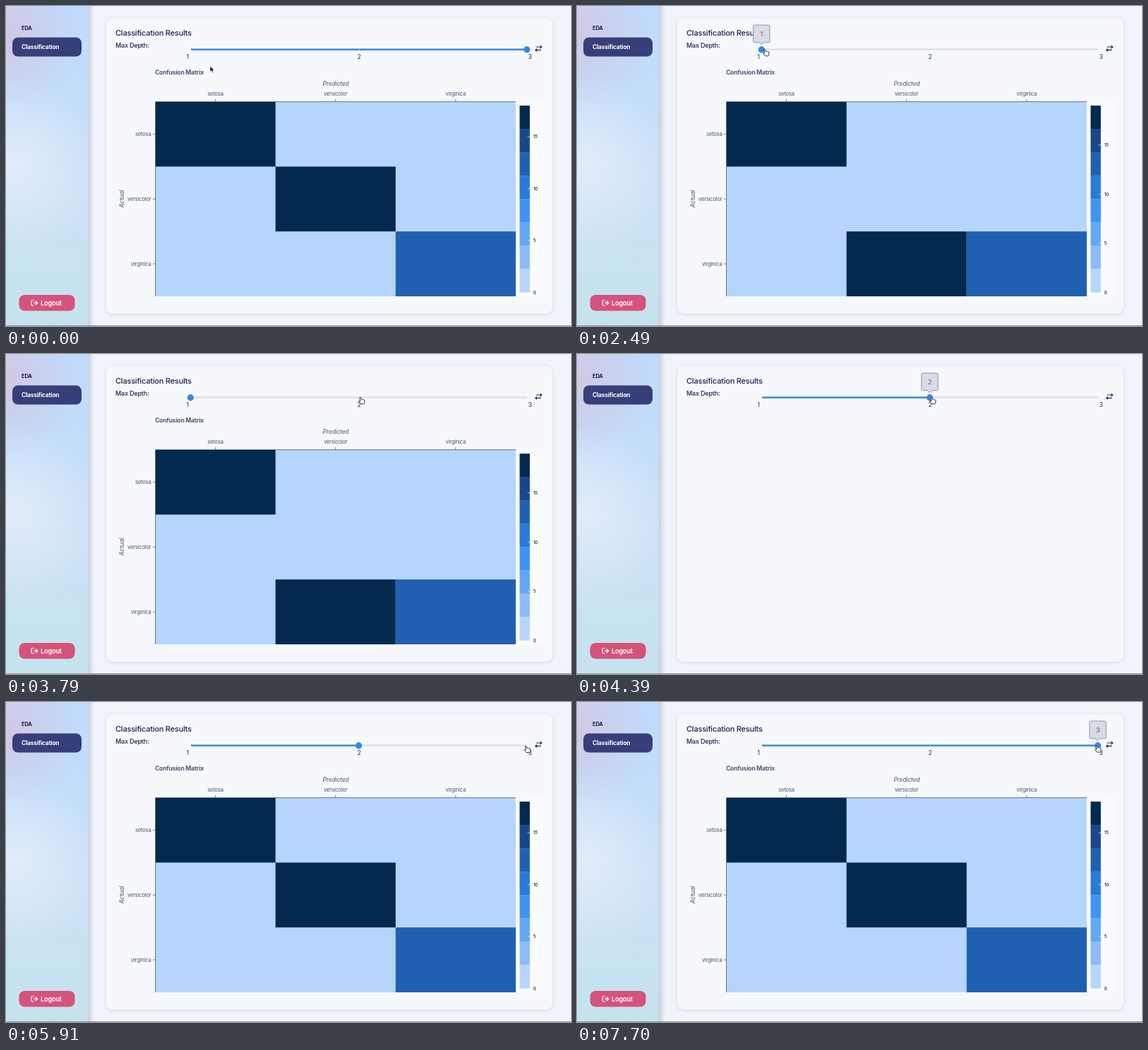
An HTML page that plays this animation: 800x453 px, repeating every 7730 ms.

```html
<!DOCTYPE html>
<html lang="en">
<head>
<meta charset="utf-8">
<title>Classification Results</title>
<style>
  html, body { margin: 0; width: 100%; height: 100%; overflow: hidden; }
  body { background: #f2f4fb; }
  svg { position: absolute; left: 0; top: 0; }
  text { font-family: Inter, "Open Sans", sans-serif; letter-spacing: -.02em; fill: #1a2350; }
  .mid { text-anchor: middle; }
  .end { text-anchor: end; }
  .bold { font-weight: 700; }
  .axis text { font-size: 7.5px; fill: #4d5470; }
  .axis .title { font-size: 8.5px; font-style: italic; }
  .scale text { font-size: 6.3px; font-weight: 500; fill: #242a3c; }
  .marks text { font-size: 8.3px; }
  .icon { fill: none; stroke-linecap: round; stroke-linejoin: round; }
</style>
</head>
<body>
<svg width="800" height="453" viewBox="0 0 800 453">
  <defs>
    <linearGradient id="side" x1="0" y1="0" x2="0" y2="1">
      <stop offset="0" stop-color="#bfdbff"/>
      <stop offset=".3" stop-color="#c2def9"/>
      <stop offset=".6" stop-color="#cbe2f5"/>
      <stop offset="1" stop-color="#c5e3ee"/>
    </linearGradient>
    <radialGradient id="pink" gradientUnits="userSpaceOnUse" cx="0" cy="40" r="110">
      <stop offset="0" stop-color="#d2c8e2"/>
      <stop offset="1" stop-color="#d2c8e2" stop-opacity="0"/>
    </radialGradient>
    <radialGradient id="pale" gradientUnits="userSpaceOnUse" cx="14" cy="225" r="125">
      <stop offset="0" stop-color="#e2ebfa"/>
      <stop offset="1" stop-color="#e2ebfa" stop-opacity="0"/>
    </radialGradient>
    <linearGradient id="edge">
      <stop offset="0" stop-color="#4b5170" stop-opacity=".24"/>
      <stop offset="1" stop-color="#4b5170" stop-opacity="0"/>
    </linearGradient>
    <filter id="soft" x="-5%" y="-5%" width="110%" height="110%">
      <feDropShadow dx="0" dy="1" stdDeviation="2" flood-color="#40486e" flood-opacity=".2"/>
    </filter>
  </defs>

  <rect x="116" width="9" height="453" fill="url(#edge)"/>
  <rect width="116" height="453" fill="url(#side)"/>
  <rect width="116" height="453" fill="url(#pink)"/>
  <rect width="116" height="453" fill="url(#pale)"/>
  <text class="bold" x="22" y="34" font-size="7.5">EDA</text>
  <rect x="9" y="44.5" width="98" height="27" rx="8" fill="#383e7a"/>
  <text class="bold" x="22" y="61" font-size="8.3" style="fill:#fff">Classification</text>
  <rect x="18.5" y="409" width="79" height="22.5" rx="8" fill="#d5527a"/>
  <path class="icon" stroke="#fff" stroke-width="1.2" d="M39 416.5H37.5Q36 416.5 36 418V422.5Q36 424 37.5 424H39M39.5 420.2H44.5M42 417.6L44.7 420.2L42 422.8"/>
  <text x="49" y="423.6" font-size="9.2" font-weight="600" style="fill:#fff">Logout</text>

  <rect x="142" y="17.5" width="632" height="418" rx="9" fill="#f7f8fb" filter="url(#soft)"/>
  <text x="155" y="41.6" font-size="11" font-weight="500">Classification Results</text>
  <text x="155" y="59.2" font-size="9" font-weight="500">Max Depth:</text>
  <path class="icon" stroke="#1a2350" stroke-width="1.1" d="M751 58H758.5M756.6 56.2L758.5 58L756.6 59.8M757 62.4H749.5M751.4 60.6L749.5 62.4L751.4 64.2"/>

  <g id="chart">
    <text class="bold" x="211" y="97.3" font-size="8.5" style="fill:#4d5470">Confusion Matrix</text>
    <rect x="722" y="135.5" width="38" height="275.5" fill="#fafbfc"/>
    <rect x="211.5" y="135.5" width="510.3" height="275.5" fill="#b6d5fb"/>
    <g id="cells"></g>
    <g class="axis" id="axis">
      <path d="M211.5 411V135.5H721.8" fill="none" stroke="#555d74" stroke-width=".8"/>
      <text class="mid title" x="467" y="112.8">Predicted</text>
      <text class="mid title" transform="translate(167 273) rotate(-90)">Actual</text>
    </g>
    <g class="scale" id="bands"></g>
    <g class="scale" id="ticks"></g>
  </g>

  <rect x="262" y="60.6" width="476" height="2" rx="1" fill="#d9dce8"/>
  <rect id="fill" x="262" y="60.4" height="2.4" fill="#318ae6"/>
  <rect x="499.5" y="60.6" width="1" height="2" fill="#a9cdf4"/>
  <circle id="knob" cy="61.7" r="4.6" fill="#318ae6"/>
  <g class="marks mid">
    <text x="257" y="75">1</text><text x="500" y="75">2</text><text x="742" y="75">3</text>
  </g>
  <g id="tip">
    <path d="M-10 27H10Q11.7 27 11.7 28.7V50Q11.7 51.7 10 51.7H3L0 54.7L-3 51.7H-10Q-11.7 51.7-11.7 50V28.7Q-11.7 27-10 27Z" fill="#d9dbe5" stroke="#858ba6" stroke-width=".9"/>
    <text class="mid" id="tipText" y="42.6" font-size="9.5" style="fill:#596080"></text>
  </g>

  <path id="arrow" d="M0 0V8.3L1.9 6.6L3.2 9.6L4.7 9L3.4 6.1H6Z" fill="#111" stroke="#fff" stroke-width=".7"/>
  <path id="hand" d="M-1.6 .2Q-.8 -.6 0 .2L.8 2.8Q1.8 2.2 2.4 3Q3.4 2.5 4 3.4Q5.2 3 5.4 4.4V6.4Q5.3 7.8 4.5 9.2H-.2L-2.9 5.8Q-3.3 4.8 -2.2 4.7L-.8 5.5Z" fill="#fff" stroke="#222" stroke-width=".9" stroke-linejoin="round"/>
  <rect y="452" width="800" height="1" fill="#92959d"/>
</svg>
<script>
const LOOP = 7730;
const $ = id => document.getElementById(id);
const NAMES = ['setosa', 'versicolor', 'virginica'];
const BANDS = ['#03294f', '#18488a', '#1f61b0', '#287bd8', '#3f94f2', '#62a7f3', '#8dbdf6', '#b8d6fb'];
const [LEFT, TOP, CELL_W, CELL_H] = [211.5, 135.5, 170.1, 91.83];
const KNOB = [0, 261.3, 499.5, 737.5];

// Slider clicks: the chart is blank from `blank` until `ready`.
const CLICKS = [
  { at: 1900, blank: 1950, ready: 2480, tipEnd: 2520, value: 1 },
  { at: 4060, blank: 4110, ready: 4720, tipEnd: 5060, value: 2 },
  { at: 6170, blank: 6220, ready: 6830, tipEnd: LOOP, value: 3 }
];
// Pointer path: time, x, y
const PATH = [
  [0, 289, 85], [900, 289, 85], [1600, 269, 63], [1820, 269, 63], [1900, 266.5, 61.5],
  [3000, 266.5, 61.5], [3800, 502.5, 61.5], [5000, 502.5, 61.5], [5800, 737, 62.5],
  [6000, 737, 62.5], [6170, 737, 61.8], [LOOP, 736.5, 61.8]
];

const cell = (row, col, color) =>
  `<rect x="${LEFT + col * CELL_W}" y="${TOP + row * CELL_H}" width="${CELL_W}" height="${CELL_H}" fill="${color}"/>`;

NAMES.forEach((name, i) => {
  const x = LEFT + (i + .5) * CELL_W, y = TOP + (i + .5) * CELL_H;
  $('axis').innerHTML += `<path d="M${x} 132V135.5M208 ${y}H211.5" stroke="#555d74" stroke-width=".8"/>
    <text class="mid" x="${x}" y="127.4">${name}</text><text class="end" x="205.5" y="${y + 2.6}">${name}</text>`;
});
$('bands').innerHTML = BANDS.map((color, i) =>
  `<rect x="727.3" y="${141 + i * 33.06}" width="14.4" height="33.2" fill="${color}"/>`).join('');

function drawChart(value) {
  const predicted = value === 1 ? [0, 2] : [0, 1];
  const step = value === 1 ? 69.6 : 73.45;
  $('cells').innerHTML = cell(0, 0, BANDS[0]) +
    cell(predicted[1], 1, BANDS[0]) + cell(2, 2, BANDS[2]);
  $('ticks').innerHTML = [0, 1, 2, 3].map(i => {
    const y = 405.5 - i * step;
    return `<path d="M738.5 ${y}H742" stroke="#dce8f8" stroke-width=".8"/><text x="746.5" y="${y + 2.2}">${i * 5}</text>`;
  }).join('');
}

function pointerAt(t) {
  const i = PATH.findIndex(p => p[0] > t);
  const [t0, x0, y0] = PATH[i - 1], [t1, x1, y1] = PATH[i];
  const u = (t - t0) / (t1 - t0), e = u * u * (3 - 2 * u);
  return [x0 + (x1 - x0) * e, y0 + (y1 - y0) * e];
}

const show = (id, on) => $(id).style.display = on ? '' : 'none';
let drawn = 0;

function frame(now) {
  const t = now % LOOP;
  const click = CLICKS.filter(c => t >= c.at).pop();
  const value = click ? click.value : 3;
  if (value !== drawn) drawChart(drawn = value);
  show('chart', !click || t < click.blank || t >= click.ready);

  const x = KNOB[value];
  $('knob').setAttribute('cx', x);
  $('fill').setAttribute('width', Math.max(0, x - 262));
  show('tip', click && t < click.tipEnd);
  $('tip').setAttribute('transform', `translate(${x} 0)`);
  $('tipText').textContent = value;

  const at = `translate(${pointerAt(t)})`;
  $('arrow').setAttribute('transform', at);
  $('hand').setAttribute('transform', at);
  show('arrow', t < 1880);
  show('hand', t >= 1880);
  requestAnimationFrame(frame);
}
requestAnimationFrame(frame);
</script>
</body>
</html>
```
